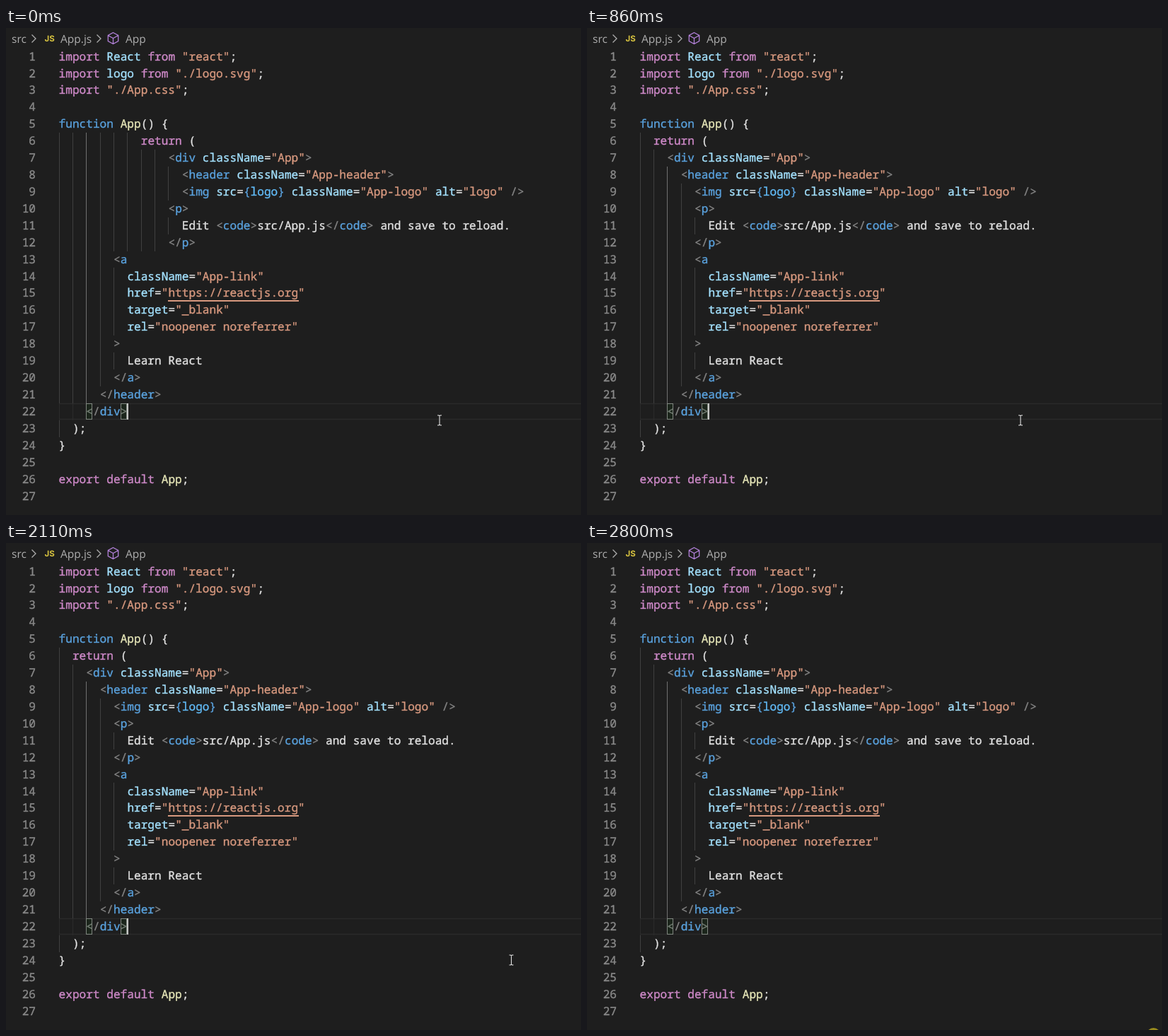
Animation of 813x689 px, one loop 2.87 s. Source, as an HTML page:

```html
<!DOCTYPE html>
<html lang="en">
<head>
<meta charset="utf-8">
<title>Format on save</title>
<style>
  html, body { margin: 0; width: 100%; height: 100%; overflow: hidden; background: #1e1e1e; }
  svg { display: block; }
  text { white-space: pre; text-rendering: geometricPrecision; }
  .mono { font: 16.13px "Noto Sans Mono", "DejaVu Sans Mono", monospace; stroke-width: .35; }
  .crumb { font: 15.5px "Open Sans", "Noto Sans", sans-serif; fill: #adadad; }
  .badge { font: bold 11.5px Inter, "Open Sans", sans-serif; fill: #d6c23f; }
  .line { fill: none; stroke-width: 1.3; }
</style>
</head>
<body>
<svg id="stage" width="813" height="689" viewBox="0 0 813 689">
  <text class="crumb" x="8" y="20.5">src</text>
  <text class="badge" x="54.5" y="18.5">JS</text>
  <text class="crumb" x="77" y="20.5">App.js</text>
  <text class="crumb" x="169" y="20.5">App</text>
  <path class="line" stroke="#adadad" d="M36.5 9.5l5.5 5.5l-5.5 5.5M128.5 9.5l5.5 5.5l-5.5 5.5"/>
  <path class="line" stroke="#b180d7" d="M151.5 6.5l7.2 4v8l-7.2 4l-7.2-4v-8zM144.3 10.5l7.2 4l7.2-4M151.5 14.5v8"/>

  <path d="M75 531.5H813M75 553.5H813" stroke="#2a2a2a" stroke-width="1.6"/>
  <g id="code"></g>
  <path d="M229 386H414" stroke="#d8997f" stroke-width="2"/>
  <g fill="#006400" fill-opacity=".1" stroke="#7f867f">
    <rect x="113.5" y="531.5" width="8" height="22"/>
    <rect x="162.5" y="531.5" width="8" height="22"/>
  </g>
  <rect id="caret" x="171" y="531" width="2" height="23" fill="#c4c5c3"/>
  <path id="mouse" fill="none" stroke="#e4e4e4" stroke-width="1.1"
    d="M-3-7h2l1 1l1-1h2M0-6V6M-3 7h2l1-1l1 1h2"/>
  <circle id="spot" cx="801" cy="695.7" r="9.7" fill="#9a8c1e"/>
</svg>
<script>
const LOOP = 2870, FORMAT_AT = 860;
const LEFT = 74.6, CHAR = 9.678, BASE = 45.6, STEP = 23.92, ACTIVE = 22;

const colors = {
  k: '#cf8ac9', b: '#5aa2de', v: '#a4e2ff', s: '#d8997f',
  g: '#848484', w: '#e2e2e2', f: '#e6e6b8', c: '#62bcf8', n: '#8a8a8a'
};

// Each row: tidy indent, tokens split by "~" (first letter = colour), messy indent if different.
const rows = [
  [0, 'kimport ~vReact ~kfrom ~s"react"~w;'],
  [0, 'kimport ~vlogo ~kfrom ~s"./logo.svg"~w;'],
  [0, 'kimport ~s"./App.css"~w;'],
  [0, ''],
  [0, 'bfunction ~fApp~w() {'],
  [2, 'kreturn ~w(', 12],
  [4, 'g<~bdiv ~vclassName~w=~s"App"~g>', 16],
  [6, 'g<~bheader ~vclassName~w=~s"App-header"~g>', 18],
  [8, 'g<~bimg ~vsrc~w=~b{~clogo~b} ~vclassName~w=~s"App-logo" ~valt~w=~s"logo" ~g/>', 18],
  [8, 'g<~bp~g>', 16],
  [10, 'wEdit ~g<~bcode~g>~wsrc/App.js~g</~bcode~g>~w and save to reload.', 18],
  [8, 'g</~bp~g>', 16],
  [8, 'g<~ba'],
  [10, 'vclassName~w=~s"App-link"'],
  [10, 'vhref~w=~s"https://reactjs.org"'],
  [10, 'vtarget~w=~s"_blank"'],
  [10, 'vrel~w=~s"noopener noreferrer"'],
  [8, 'g>'],
  [10, 'wLearn React'],
  [8, 'g</~ba~g>'],
  [6, 'g</~bheader~g>'],
  [4, 'g</~bdiv~g>'],
  [2, 'w);'],
  [0, 'w}'],
  [0, ''],
  [0, 'kexport default ~fApp~w;'],
  [0, '']
];

const $ = id => document.getElementById(id);

function add(parent, tag, attrs, text = '') {
  const el = document.createElementNS('http://www.w3.org/2000/svg', tag);
  for (const name in attrs) el.setAttribute(name, attrs[name]);
  el.textContent = text;
  return parent.appendChild(el);
}

function addText(parent, x, y, key, text, anchor = 'start') {
  const color = colors[key];
  add(parent, 'text', { class: 'mono', x, y, fill: color, stroke: color, 'text-anchor': anchor }, text);
}

function guideColor(col, line) {
  if (line === ACTIVE) return '#2b2b2b';
  return col === 4 ? '#707070' : '#404040';
}

function drawRow(parent, line, indent, tokens) {
  const y = BASE + (line - 1) * STEP;
  for (let col = 0; col < indent; col += 2) {
    add(parent, 'rect', {
      x: Math.round(LEFT + col * CHAR), y: Math.round(y - 17.2),
      width: 1, height: 24, fill: guideColor(col, line)
    });
  }
  if (!tokens) return;
  let col = indent;
  for (const token of tokens.split('~')) {
    const text = token.slice(1);
    addText(parent, LEFT + col * CHAR, y, token[0], text);
    col += text.length;
  }
}

const messy = add($('code'), 'g', {});
const tidy = add($('code'), 'g', {});
rows.forEach(([indent, tokens, messyIndent], i) => {
  const line = i + 1;
  addText($('code'), 42, BASE + i * STEP, 'n', line, 'end');
  if (messyIndent) {
    drawRow(messy, line, messyIndent, tokens);
    drawRow(tidy, line, indent, tokens);
  } else {
    drawRow($('code'), line, indent, tokens);
  }
});

// [start, value] steps; each holds until the next.
const caretSteps = [[0, 1], [310, 0], [780, 1], [1330, 0], [1800, 1], [2320, 0]];
const mouseSteps = [
  [0, [613, 555]], [2040, [664, 568]], [2110, [714.5, 590]], [2180, [721, 612]],
  [2250, [727, 638]], [2320, [750, 658]], [2400, [774, 673]], [2490, null]
];
const at = (steps, t) => steps.filter(step => step[0] <= t).pop()[1];
const show = (el, on) => el.setAttribute('visibility', on ? 'visible' : 'hidden');

function draw() {
  const t = performance.now() % LOOP;
  const pos = at(mouseSteps, t);
  show(messy, t < FORMAT_AT);
  show(tidy, t >= FORMAT_AT);
  show($('caret'), at(caretSteps, t));
  show($('mouse'), pos);
  if (pos) $('mouse').setAttribute('transform', `translate(${pos})`);
  show($('spot'), t >= 2800);
  requestAnimationFrame(draw);
}
draw();
</script>
</body>
</html>
```
